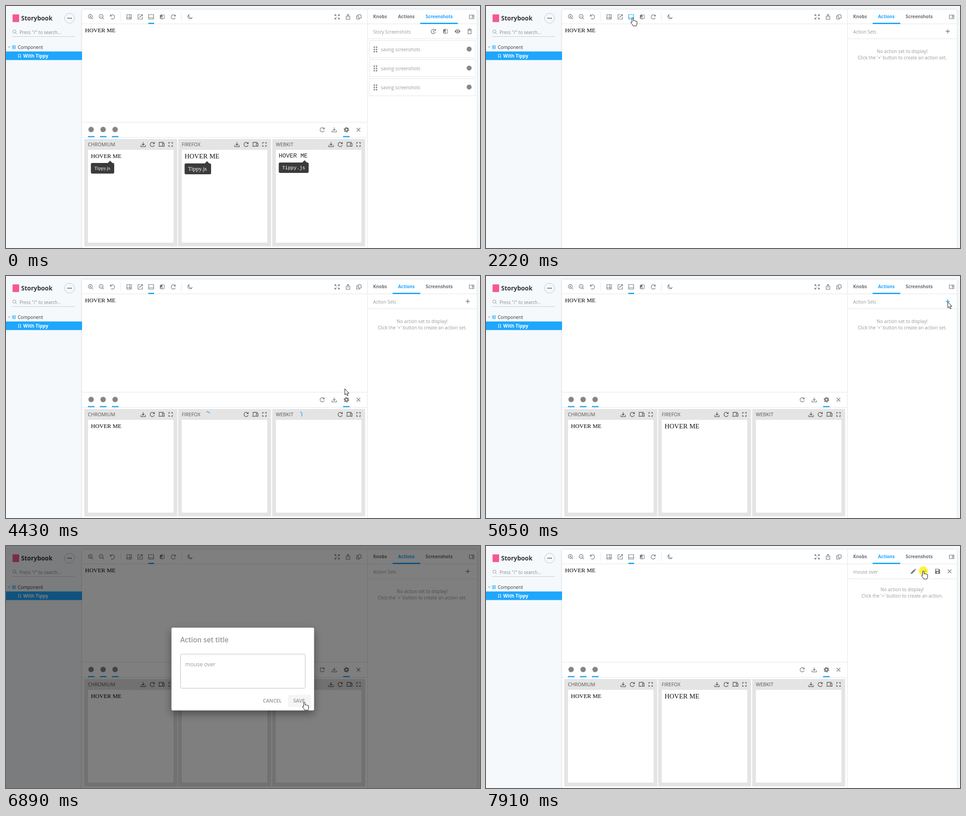
Animation of 1047 by 535 pixels, one loop 8000 ms. Source, as an HTML page:

```html
<!DOCTYPE html>
<html lang="en">
<head>
<meta charset="utf-8">
<title>Story screenshots</title>
<style>
html, body { margin: 0; width: 100%; height: 100%; overflow: hidden; background: #f6f9fc; }
svg { display: block; font-family: "Open Sans", "Noto Sans", sans-serif; }
text { white-space: pre; }
</style>
</head>
<body>
<svg id="stage" width="1047" height="535" viewBox="0 0 1047 535"></svg>
<script>
const LOOP = 8000, BLUE = '#1ea7fd', GREY = '#777', LABEL = '#999';
const SERIF = '"Liberation Serif", serif', MONO = '"Liberation Mono", monospace';

const STEPS = [0, 400, 600, 800, 1000, 1200, 1400, 1600, 1800, 2020, 2220, 2620, 2820, 3020, 3220,
  3420, 3630, 3850, 4050, 4250, 4450, 4650, 4850, 5050, 5270, 5450, 5650, 5850, 6070, 6290, 6490,
  6690, 6890, 7090, 7290, 7490, 7690, 7910];

// Pointer path: time, x, y
const PATH = [[400, 480, 330], [1200, 222, 56], [1600, 222, 56], [2220, 324, 26], [2620, 324, 26],
  [3420, 510, 418], [3700, 510, 418], [4850, 1020, 57], [6100, 1020, 57], [6890, 659, 345],
  [7290, 980, 241], [7690, 966, 55], [8000, 966, 55]];

const STROKED = {
  zoomIn: 'M4-1A4.3 4.3 0 1 1-4.6-1 4.3 4.3 0 0 1 4-1M2.7 2.2 5.6 5.2M-2.2-1H1.6M-.3-2.9V.9',
  zoomOut: 'M4-1A4.3 4.3 0 1 1-4.6-1 4.3 4.3 0 0 1 4-1M2.7 2.2 5.6 5.2M-2.2-1H1.6',
  reset: 'M-4.6-5V-1.6H-1.2M-4.3-2A4.8 4.8 0 1 1-3 4',
  grid: 'M-5-5H5V5H-5ZM-5 2H5M2 2V5M1.5 2V-5',
  open: 'M0-5H-5V5H5V0M1.5-5H5V-1.5M5-5-2 2',
  dock: 'M-5.5-5H5.5V5H-5.5ZM-5.5 2H5.5',
  side: 'M-5-4H5V4H-5ZM1.5-4V4M2.5-2H4M2.5 0H4',
  refresh: 'M4.6-5V-1.6H1.2M4.3-1.8A4.7 4.7 0 1 0 4.5 1.6',
  moon: 'M-1.5-5A5 5 0 1 0 5 2 5 5 0 0 1-1.5-5Z',
  expand: 'M-5-2V-5H-2M2-5H5V-2M5 2V5H2M-2 5H-5V2M-5-5-1.5-1.5M5-5 1.5-1.5M5 5 1.5 1.5M-5 5-1.5 1.5',
  share: 'M-1.5-1.5H-4V5.5H4V-1.5H1.5M0 2V-5.5M-2.4-3.2 0-5.6 2.4-3.2',
  copy: 'M-1.5-5H3L5-3V2.5H-1.5ZM-1.5-2.5H-5V5H1.5V2.5',
  download: 'M-5 1.5V4.8H5V1.5M0-5V1.5M-2.8-1 0 1.8 2.8-1',
  devices: 'M-5 2.5V-4.5H5M-6.5 4H1M2.3-2H6V4H2.3Z',
  full: 'M-4-1.5V-4H-1.5M1.5-4H4V-1.5M4 1.5V4H1.5M-1.5 4H-4V1.5',
  close: 'M-4-4 4 4M-4 4 4-4',
  plus: 'M-4.5 0H4.5M0-4.5V4.5',
  search: 'M2.5-1A3.5 3.5 0 1 1-4.5-1 3.5 3.5 0 0 1 2.5-1M1.5 1.6 4.5 4.6',
  bookmark: 'M-2.5-3.5H2.5V3.5L0 1.3-2.5 3.5Z',
  tiles: 'M-3.3-3.3H3.3V3.3H-3.3ZM0-3.3V3.3M-3.3 0H3.3',
  history: 'M5-5V-1.8H1.8M4.4-2A4.9 4.9 0 1 0 4.9 1M0-2.6V.6L2.2 2'
};
const FILLED = {
  compare: 'M-5-4.5H-.6V-6H.6V6H-.6V4.5H-5ZM-4 3.2H-.6V-1ZM1.5-4.5H5V4.5H1.5V3.4H4V-3.4H1.5Z',
  eye: 'M-6.5 0Q0-9 6.5 0 0 9-6.5 0ZM-3 0A3 3 0 0 0 3 0 3 3 0 0 0-3 0ZM-1.7 0A1.7 1.7 0 0 1 1.7 0 1.7 1.7 0 0 1-1.7 0Z',
  trash: 'M-4.5-5H-2L-1.2-6H1.2L2-5H4.5V-3.8H-4.5ZM-4-3H4V6H-4ZM-2.8-1.8V4.8H2.8V-1.8Z',
  pencil: 'M-5.5 5.5V3L2-4.5 4.5-2-3 5.5ZM2.8-5.2 4-6 6-4 5.2-2.8Z',
  save: 'M-5.5-5.5H3L5.5-3V5.5H-5.5ZM-4-4.2V-1.2H2.2V-4.2ZM-1.8 2.4A1.8 1.8 0 0 0 1.8 2.4 1.8 1.8 0 0 0-1.8 2.4Z'
};
const ARROW = 'M0 0V13.5L3 10.8 5.2 15.6 7.4 14.6 5.2 10H9.2Z';
const HAND = 'M-1.5 1Q0-1.2 1.5 1V6.5Q3 5 4.3 7 6 5.8 7 7.6 9 6.8 9.5 9V13Q9.5 15 8 18H1Q-1 14-4 11-3.8 8.5-1.5 10.2Z';

const rect = (x, y, w, h, fill, more = '') =>
  `<rect x="${x}" y="${y}" width="${w}" height="${h}" fill="${fill}" ${more}/>`;
const circle = (x, y, r, fill, more = '') => `<circle cx="${x}" cy="${y}" r="${r}" fill="${fill}" ${more}/>`;
const path = (d, x, y, more) => `<path d="${d}" transform="translate(${x} ${y})" ${more}/>`;
const text = (s, x, y, size, fill, more = '') =>
  `<text x="${x}" y="${y}" font-size="${size}" fill="${fill}" ${more}>${s}</text>`;
const icon = (name, x, y, color = GREY, width = 1.2) => FILLED[name]
  ? path(FILLED[name], x, y, `fill="${color}" fill-rule="evenodd"`)
  : path(STROKED[name], x, y, `fill="none" stroke="${color}" stroke-width="${width}"`);
const hLine = (x1, x2, y, color = '#e3e5e8') => rect(x1, y, x2 - x1, 1, color);
const vLine = (x, y1, y2) => rect(x, y1, 1, y2 - y1, '#e3e5e8');
const bold = 'font-weight="700"', middle = 'text-anchor="middle"';
const font = f => `font-family='${f}'`;

function tooltip(x, y, w, h, size, family, pad) {
  return rect(x, y, w, h, '#3b3b3b', 'rx="3"') + path('M-5 0 0-5 5 0Z', x + w - 9, y, 'fill="#3b3b3b"') +
    text('Tippy.js', x + pad, y + h / 2 + size * .32, size, '#fff', font(family));
}

function sidebar() {
  return rect(14.5, 18.5, 14.5, 17, '#f7578f', 'rx="1"') +
    text('Storybook', 33.5, 32, 13.5, '#333', bold) +
    circle(140.5, 27, 11, 'none', 'stroke="#b9c3cc"') +
    [137, 140.5, 144].map(x => circle(x, 27, 1.3, '#555')).join('') +
    icon('search', 19.5, 57.5, '#999', 1) +
    text('Press "/" to search...', 30, 61.5, 9.9, '#888') + hLine(14, 152, 67, '#c5cace') +
    path('M-3-1.5H3L0 2Z', 7, 91, 'fill="#bbb"') + icon('tiles', 17.5, 91, BLUE, 1) +
    text('Component', 26, 94.5, 10.1, '#333') +
    rect(0, 100.5, 168, 19, BLUE) + icon('bookmark', 30, 110.5, '#fff', 1) +
    text('With Tippy', 38, 114, 10.4, '#fff', bold);
}

function toolbar(panelOpen, hover) {
  const icons = { zoomIn: 186.5, zoomOut: 210.5, reset: 235, grid: 272, open: 296.5, compare: 345,
    refresh: 369.5, moon: 406, expand: 731.5, share: 755.5, copy: 779.5 };
  return Object.entries(icons).map(([name, x]) => icon(name, x, 24)).join('') +
    icon('dock', 320.5, 24, hover ? BLUE : GREY) + vLine(253, 14, 33) + vLine(387, 14, 33) +
    hLine(168, 798, 39) + (panelOpen ? rect(314.5, 37, 12.5, 3, BLUE) : '');
}

const BROWSERS = [
  { x: 173, name: 'CHROMIUM', ready: 4250, spin: [257, 150, 140] },
  { x: 380.2, name: 'FIREFOX', ready: 4450, spin: [444.5, 92, 85] },
  { x: 588, name: 'WEBKIT', ready: 4650, spin: [648, 130, 115] }
];

function spinner(t, [x, start, sweep]) {
  const r = 6, length = sweep * Math.PI / 180 * r;
  return circle(x, 306, r, 'none', `stroke="${BLUE}" stroke-width="1.4" stroke-dasharray="${length} 40"
    transform="rotate(${start + (t - 3630) * 360 / 1400} ${x} 306)"`);
}

function browser(t, { x, name, ready, spin }, done) {
  const loaded = done || t >= ready;
  return rect(x, 294, 205.4, 237.5, '#e4e4e4') + rect(x + 8, 318, 189, 205, '#fff') +
    text(name, x + 8, 310, 10.8, '#555') +
    ['download', 'refresh', 'devices', 'full'].map((n, i) =>
      i || loaded ? icon(n, x + 130 + i * 20.2, 306, '#555', 1.3) : '').join('') +
    (loaded ? '' : spinner(t, spin));
}

function previews(t, done) {
  let s = hLine(168, 798, 256.5) + hLine(168, 798, 290);
  for (const x of [188, 214.5, 241]) s += circle(x, 273, 6, '#858585') + rect(x - 7, 287.5, 14.5, 2.5, BLUE);
  s += icon('refresh', 698.5, 273.5) + icon('download', 725, 273.5) + icon('close', 778.5, 273.5) +
    circle(752, 273.5, 3.4, 'none', `stroke="${GREY}" stroke-width="2.8"`) +
    circle(752, 273.5, 5.2, 'none', `stroke="${GREY}" stroke-width="1.8" stroke-dasharray="2.2 3.245"`) +
    rect(744.5, 287.5, 14.5, 2.5, BLUE);
  for (const b of BROWSERS) s += browser(t, b, done);
  if (done || t >= BROWSERS[0].ready) s += text('HOVER ME', 187.5, 336, 13, '#000', font(SERIF));
  if (done || t >= BROWSERS[1].ready) s += text('HOVER ME', 394.5, 336.7, 14.8, '#111', font(SERIF));
  if (done) {
    s += text('HOVER ME', 602.5, 335, 13.3, '#222', font(MONO)) +
      tooltip(187.5, 347, 51.5, 23.5, 11, SERIF, 7.5) + tooltip(394.5, 348, 58.5, 24, 13, SERIF, 7.5) +
      tooltip(602.5, 346, 66, 23, 10.6, MONO, 7.5);
  }
  return s;
}

function addon(t, done, editing) {
  const active = done ? 'Screenshots' : 'Actions';
  let s = vLine(798, 8, 535) + hLine(799, 1040, 39) + hLine(799, 1040, 72) + icon('side', 1028.5, 24);
  for (const [name, x, left, w] of [['Knobs', 811, 799, 55], ['Actions', 866, 854, 61], ['Screenshots', 927, 915, 83]]) {
    const on = name === active;
    s += text(name, x, 27.3, 9.9, on ? BLUE : '#6f6f6f', bold) + (on ? rect(left, 37, w, 3, BLUE) : '');
  }
  const title = done ? 'Story Screenshots' : editing ? 'mouse over' : 'Action Sets';
  s += text(title, 811, 60.7, 9.95, LABEL);
  if (done) {
    ['history', 'compare', 'eye', 'trash'].forEach((n, i) => s += icon(n, 944 + i * 26.7, 56, GREY));
    for (const y of [76.5, 118.5, 160.5]) {
      s += rect(802.5, y, 234, 38, '#fff', 'stroke="#e3e5e8"');
      for (let i = 0; i < 6; i++) s += circle(813.5 + i % 2 * 5, y + 14.5 + (i >> 1) * 5, 1.8, '#8a8a8a');
      s += text('saving screenshots', 828, y + 23.7, 9.9, LABEL) + circle(1023, y + 18.7, 5.5, '#888');
    }
    return s;
  }
  const noun = editing ? 'action' : 'action set', y = editing ? 100.3 : 103.5;
  s += text(`No ${noun} to display!`, 919.3, y, 10.1, LABEL, middle) +
    text(`Click the '+' button to create an ${noun}.`, 919.3, y + 14, 10.1, LABEL, middle);
  if (editing) s += icon('pencil', 944, 56) + icon('plus', 970, 56, t >= 7690 ? BLUE : GREY, 1.5) +
    icon('save', 997.5, 56) + icon('close', 1024, 56);
  else s += icon('plus', 1020, 56, t >= 5050 && t < 5270 ? BLUE : GREY, 1.4);
  return s;
}

function dialog(t, hover) {
  const typed = 'mouse over'.slice(0, Math.max(0, Math.floor((t - 5350) / 100)));
  return rect(0, 0, 1047, 535, '#000', 'opacity=".5"') +
    rect(365.5, 180.5, 315, 183, '#fff', 'rx="3" style="filter:drop-shadow(0 7px 9px rgba(0,0,0,.4))"') +
    text('Action set title', 385, 213, 15.3, '#969696', 'font-weight="600"') +
    rect(385.5, 239, 275.5, 75.5, '#fff', 'rx="3" stroke="#bdbdbd"') +
    text(typed, 396, 266, 12.1, LABEL) +
    (hover ? rect(623, 329, 51, 27, '#f5f5f5', 'rx="3"') : '') +
    text('CANCEL', 567.5, 346.3, 10.9, '#929292', 'font-weight="600"') +
    text('SAVE', 634.5, 346.3, 11, '#929292', 'font-weight="600"');
}

function pointerAt(t) {
  const i = PATH.findIndex(p => p[0] > t), [t0, x0, y0] = PATH[i - 1], [t1, x1, y1] = PATH[i];
  const k = (t - t0) / (t1 - t0), e = k * k * (3 - 2 * k);
  return [x0 + (x1 - x0) * e, y0 + (y1 - y0) * e];
}

function scene(t) {
  const done = t < 400, panelOpen = done || t >= 2620;
  const modal = t >= 5270 && t < 7090, editing = t >= 7090;
  const [x, y] = done ? [-99, -99] : pointerAt(t);
  const within = (l, top, r, b) => x >= l && x <= r && y >= top && y <= b;
  const onDock = within(310, 14, 331, 36), onSave = modal && within(623, 329, 674, 356);
  const onPlus = editing && within(958, 46, 982, 68);
  let s = rect(0, 0, 1047, 535, '#f6f9fc') +
    rect(168, 8, 872, 540, '#fff', 'style="filter:drop-shadow(0 0 2px rgba(0,0,0,.14))"') +
    sidebar() + toolbar(panelOpen, onDock) + text('HOVER ME', 174.5, 57.6, 13, '#000', font(SERIF));
  if (panelOpen) s += previews(t, done);
  s += addon(t, done, editing);
  if (t >= 1200 && t < 2020) s += tooltip(175, 69, 51.5, 23.5, 11, SERIF, 7.5);
  if (modal) s += dialog(t, onSave);
  if (t >= 7910) s += circle(966, 55, 10, '#ffee00', 'opacity=".75"');
  const hand = onDock || onSave || onPlus;
  return s + path(hand ? HAND : ARROW, x, y, 'fill="#fff" stroke="#111" stroke-linejoin="round"');
}

const stage = document.getElementById('stage');
let shown = -1;
function frame() {
  const now = performance.now() % LOOP, t = STEPS.filter(s => s <= now).pop();
  if (t !== shown) stage.innerHTML = scene(shown = t);
  requestAnimationFrame(frame);
}
frame();
</script>
</body>
</html>
```
